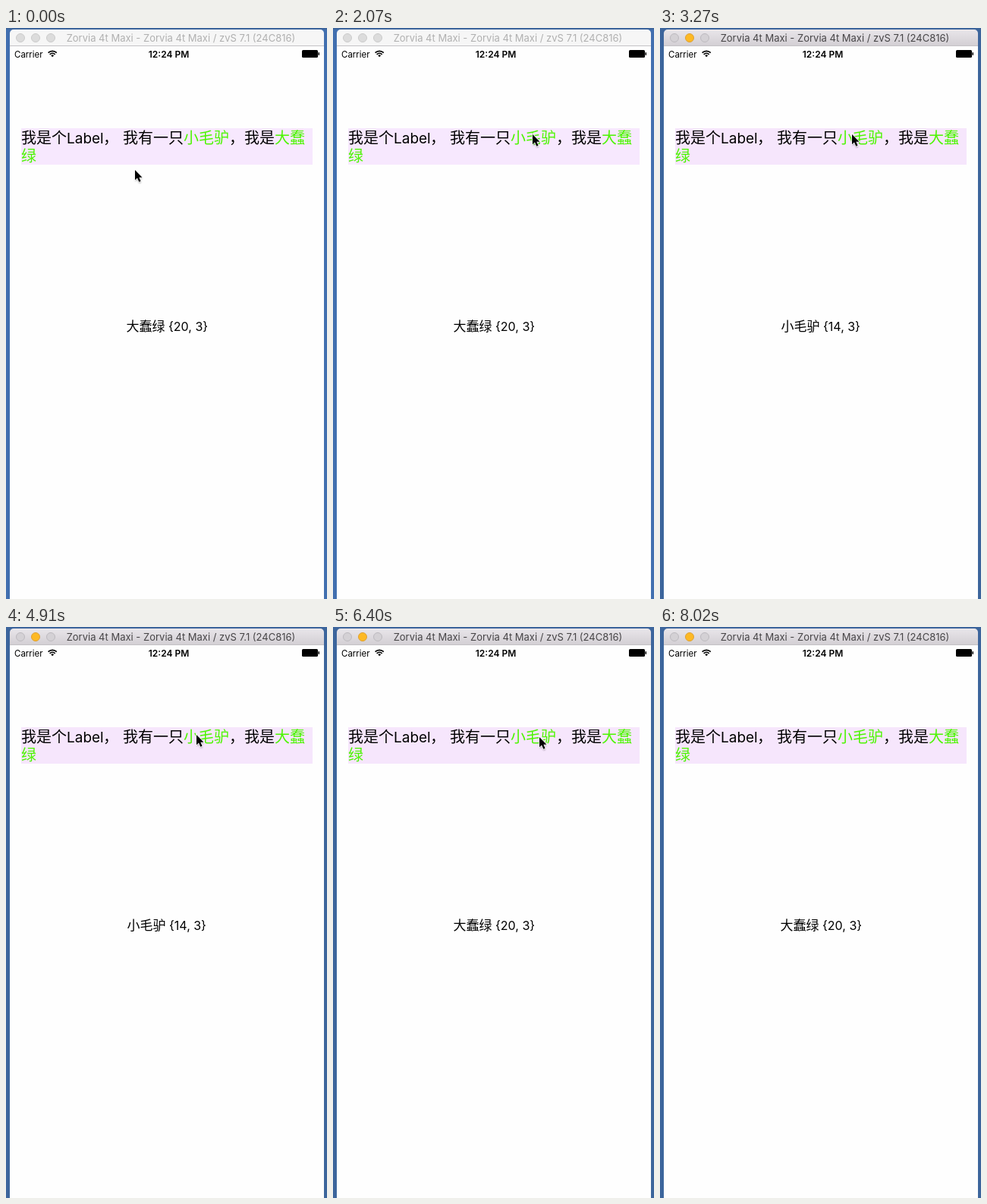
These frames come from a looping animation (423 px wide and 752 px high, 8.27 s). An HTML page:

```html
<!DOCTYPE html>
<html lang="zh-CN">
<head>
<meta charset="utf-8">
<title>Tappable label</title>
<style>
  html, body { margin: 0; width: 100%; height: 100%; overflow: hidden; background: #416faf; }
  svg { display: block; width: 423px; height: 752px; font-family: Inter, "Noto Sans CJK SC", "Noto Sans CJK", sans-serif; }
  text { white-space: pre; }
  .cjk { font-family: "Noto Sans CJK SC", "Noto Sans CJK", sans-serif; font-size: 20px; }
  .link { fill: #4cf500; }
  .desk { fill: #416faf; }
  .bar { fill: #f6f6f6; }
  .light { fill: #dcdcdc; stroke: #cbcbcb; }
  .title { fill: #b0b0b0; font-size: 13px; text-anchor: middle; }
  .box { fill: #f7e8fe; }
  .active .desk { fill: #3c659c; }
  .active .bar { fill: url(#chrome); }
  .active .light { fill: #d4d1d5; stroke: #bdbabf; }
  .active .light.mid { fill: #fdb924; stroke: #dea035; }
  .active .title { fill: #474547; }
  .active .box { fill: #f6e6fc; }
</style>
</head>
<body>
<svg id="stage" viewBox="0 0 423 752">
  <defs>
    <linearGradient id="chrome" x2="0" y2="1">
      <stop stop-color="#e9e6ea"/>
      <stop offset="1" stop-color="#d2ced3"/>
    </linearGradient>
    <filter id="soft" x="-50%" y="-50%" width="200%" height="200%"><feGaussianBlur stdDeviation="1.1"/></filter>
  </defs>

  <rect class="desk" width="423" height="752"/>
  <rect width="423" height="2" fill="#3d659c"/>
  <path class="bar" d="M5 24V7a5 5 0 0 1 5-5H414a5 5 0 0 1 5 5V24z"/>
  <rect x="5" y="23" width="414" height="1" fill="#c4c2c5"/>
  <circle class="light" cx="19" cy="13" r="5.5"/>
  <circle class="light mid" cx="39" cy="13" r="5.5"/>
  <circle class="light" cx="59" cy="13" r="5.5"/>
  <text class="title" x="230.5" y="18" id="title">Zorvia 4t Maxi - Zorvia 4t Maxi / zvS 7.1 (24C816)</text>

  <rect x="5" y="24" width="414" height="728" fill="#fefefe"/>
  <text x="11" y="38.5" font-size="11.5">Carrier</text>
  <g fill="none" stroke="#000" stroke-width="1.7">
    <path d="M55.6 32.7a8 8 0 0 1 11.2 0M57.7 34.9a5 5 0 0 1 7 0"/>
    <path d="M61.2 38.2l-1.9-2a2.7 2.7 0 0 1 3.8 0z" fill="#000" stroke="none"/>
  </g>
  <text x="214.5" y="38.5" font-size="12" font-weight="600" text-anchor="middle">12:24 PM</text>
  <rect x="390" y="29" width="21" height="10" rx="1.5"/>
  <rect x="411.5" y="32" width="1.5" height="4" rx=".7"/>

  <rect class="box" x="20" y="132" width="384" height="48"/>
  <g class="cjk">
    <text x="20" y="152">我是个</text>
    <text x="80" y="151.5" font-family="Inter, sans-serif" font-size="19">Label</text>
    <text x="128" y="152">，</text>
    <text x="154" y="152">我有一只<tspan class="link">小毛驴</tspan>，我是<tspan class="link">大蠢</tspan></text>
    <text class="link" x="20" y="176">绿</text>
  </g>

  <text class="cjk" id="word" y="399" style="font-size:17px"></text>
  <text id="range" y="398.5" font-size="16"></text>

  <g id="cursor">
    <path d="M0 1V15L3 12 5.5 17.5 8 16.5 5.8 11.3H10z" opacity=".4" filter="url(#soft)"/>
    <path d="M0 0V13.2L3 10.5 5.3 15.8 7.6 14.8 5.4 9.7H9.5z" stroke="#fff" stroke-width="1.6" paint-order="stroke"/>
  </g>
</svg>
<script>
const LOOP = 8270;
const $ = id => document.getElementById(id);

// Pointer moves: start ms, tick ms, ticks, end x, end y
const moves = [
  [740, 147, 3, 222, 154], [1181, 147, 5, 259, 140], [1920, 150, 2, 263, 140],
  [2520, 150, 3, 233, 141], [2970, 150, 3, 253, 140],
  [4470, 150, 2, 252, 141], [4910, 150, 1, 251, 142], [5060, 150, 3, 369, 146],
  [6100, 147, 3, 272, 145], [6541, 147, 2, 258, 146], [6836, 147, 3, 369, 148],
  [7430, 150, 1, 412, 474], [7580, 150, 1, 440, 780]
];
// Taps: ms, whether the first link was hit
const taps = [[0, false], [2220, true], [5510, false], [6688, true], [7280, false]];

function pointerAt(t) {
  let x = 170, y = 187;
  for (const [start, tick, ticks, endX, endY] of moves) {
    if (t < start) break;
    const p = Math.min(1, (Math.floor((t - start) / tick) + 1) / ticks);
    x += (endX - x) * p;
    y += (endY - y) * p;
  }
  return [x, y];
}

function draw(t) {
  const first = taps.findLast(tap => t >= tap[0])[1];
  $("stage").classList.toggle("active", t >= 2220);
  $("word").textContent = first ? "小毛驴" : "大蠢绿";
  $("word").setAttribute("x", first ? 159.5 : 158.5);
  $("range").textContent = first ? "{14, 3}" : "{20, 3}";
  $("range").setAttribute("x", first ? 215 : 214);
  $("cursor").setAttribute("transform", `translate(${pointerAt(t).map(Math.round)})`);
}

const begin = performance.now();
function frame() {
  draw((performance.now() - begin) % LOOP);
  requestAnimationFrame(frame);
}
frame();
</script>
</body>
</html>
```
